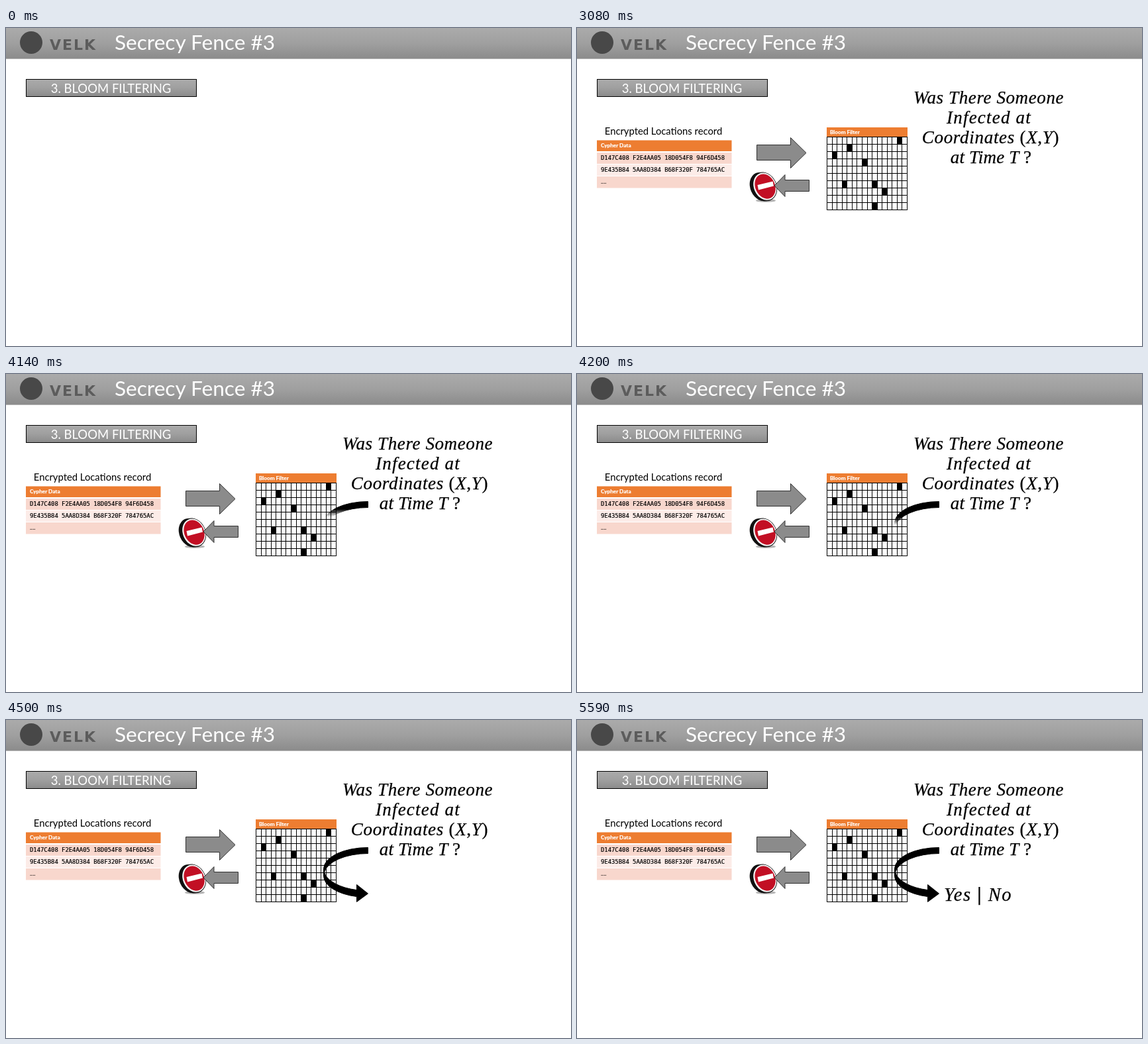
These frames come from a looping animation (853 by 480 pixels, 7.73 s). An HTML page:

```html
<!DOCTYPE html>
<html lang="en">
<head>
<meta charset="utf-8">
<title>Bloom filtering</title>
<style>
html, body { margin: 0; width: 100%; height: 100%; overflow: hidden; background: #fff; }
svg { display: block; width: 100%; height: 100%; }
text { font-family: Lato, "Open Sans", sans-serif; white-space: pre; }
.white { fill: #fff; }
.head { fill: #fff; stroke: #fff; stroke-width: .25; font-size: 8.2px; font-weight: 700; }
.code { font: 8.9px "DejaVu Sans Mono", monospace; stroke: #000; stroke-width: .2; }
.mid { text-anchor: middle; }
.math text { font: italic 27px "Liberation Serif", "Noto Serif", serif; text-anchor: middle; stroke: #000; stroke-width: .25; }
.math .up { font-style: normal; }
.crisp { shape-rendering: crispEdges; }
.block { fill: #8b8b8b; stroke: #303030; }
</style>
</head>
<body>
<svg viewBox="0 0 853 480" xmlns="http://www.w3.org/2000/svg">
  <defs>
    <linearGradient id="steel" x2="0" y2="1">
      <stop stop-color="#ababab"/>
      <stop offset=".5" stop-color="#9f9f9f"/>
      <stop offset="1" stop-color="#8b8b8b"/>
    </linearGradient>
    <linearGradient id="down" gradientUnits="userSpaceOnUse" x1="0" x2="0">
      <stop stop-color="#fff"/><stop offset="1" stop-color="#000"/>
    </linearGradient>
    <linearGradient id="across" gradientUnits="userSpaceOnUse" y1="0" y2="0">
      <stop stop-color="#fff"/><stop offset="1" stop-color="#000"/>
    </linearGradient>
    <mask id="downMask" maskUnits="userSpaceOnUse" x="0" y="0" width="853" height="480">
      <rect width="853" height="480" fill="url(#down)"/>
    </mask>
    <mask id="acrossMask" maskUnits="userSpaceOnUse" x="0" y="0" width="853" height="480">
      <rect width="853" height="480" fill="url(#across)"/>
    </mask>
  </defs>

  <rect width="853" height="480" fill="#fff"/>
  <rect width="853" height="46.6" fill="url(#steel)"/>
  <circle cx="38" cy="22" r="17" fill="#484848"/>
  <text x="66" y="33" font-size="22" font-weight="700" letter-spacing="2" fill="#5c5c5c"
    style="font-family:'DejaVu Sans',sans-serif">VELK</text>
  <text class="white" x="164" y="33" font-size="31.6">Secrecy Fence #3</text>

  <rect x="30.5" y="77.5" width="257" height="26" fill="url(#steel)" stroke="#000"/>
  <text class="white mid" x="158.5" y="98" font-size="18.5">3. BLOOM FILTERING</text>

  <g id="record">
    <text class="mid" x="130.5" y="161" font-size="14.8">Encrypted Locations record</text>
    <rect x="30" y="169.5" width="203.5" height="16.5" fill="#ed7d31"/>
    <rect x="30" y="188" width="203.5" height="17" fill="#f8d7cd"/>
    <rect x="30" y="206" width="203.5" height="17" fill="#fcece8"/>
    <rect x="30" y="224" width="203.5" height="17.5" fill="#f8d7cd"/>
    <text class="head" x="36" y="180">Cypher Data</text>
    <text class="code" x="36" y="199.3">D147C408 F2E4AA05 18D054F8 94F6D458</text>
    <text class="code" x="36" y="217.3">9E435B84 5AA8D384 B68F320F 784765AC</text>
    <text x="36" y="235" font-size="9">....</text>

    <path class="block" d="M271.5 176.5H322.5V165.5L346 188.5 322.5 211.5V199.5H271.5Z"/>

    <ellipse cx="285" cy="260.5" rx="15" ry="2.5" fill="#b5b5b5"/>
    <g transform="rotate(-24 282 240)">
      <ellipse cx="279.5" cy="238.5" rx="17.5" ry="22.5" fill="#111"/>
      <ellipse cx="283.5" cy="240" rx="18" ry="22.5" fill="#111"/>
      <ellipse cx="284" cy="240" rx="16.8" ry="21.3" fill="#f4f4f4"/>
      <ellipse cx="284.3" cy="240" rx="14.8" ry="19.3" fill="#c20f24"/>
    </g>
    <path class="white" d="M272.5 237L295.5 231.5 297 238.5 274 244.5Z"/>
    <path class="block" d="M350.5 229.5H314V221.5L298 238 314 254.5V246.5H350.5Z"/>

    <rect class="crisp" x="377" y="150" width="122" height="15" fill="#ed7d31"/>
    <text class="head" x="382" y="160">Bloom Filter</text>
    <path id="cells" class="crisp"/>
    <path id="grid" class="crisp" stroke="#000" fill="none"/>
  </g>

  <g id="question" class="math">
    <text x="621.5" y="114" letter-spacing=".6">Was There Someone</text>
    <text x="622" y="144" letter-spacing="1.2">Infected at</text>
    <text x="624.5" y="174" letter-spacing=".7">Coordinates <tspan class="up">(</tspan>X<tspan class="up">,</tspan>Y<tspan class="up">)</tspan></text>
    <text x="625" y="204" letter-spacing=".2">at Time T <tspan class="up">?</tspan></text>
  </g>

  <g id="turn" mask="url(#downMask)">
    <path stroke="#000" d="M546.5 192.5A67 32.5 0 0 0 479.5 225V235A67 32.5 0 0 0 529.5 266.6V274.5L546.5 262 529.5 248.5V256.6A67 32.5 0 0 1 480.5 230A67 32.5 0 0 1 546.5 201.5Z"/>
  </g>

  <g id="answer" class="math" mask="url(#acrossMask)">
    <text x="605.5" y="273" style="font-size:28.5px" letter-spacing="1.5">Yes <tspan class="up" font-weight="700">|</tspan> No</text>
  </g>
</svg>
<script>
const LOOP = 7730, STEP = 60;
const $ = id => document.getElementById(id);

const GRID = { x: 377, y: 164, cols: 16, rows: 10, w: 121 / 16, h: 11 };
const MARKS = [[14, 0], [4, 1], [1, 2], [7, 3], [3, 6], [9, 6], [11, 7], [9, 9]];

function buildGrid({ x, y, cols, rows, w, h }) {
  const colX = c => Math.round(x + c * w);
  let lines = "";
  for (let c = 0; c <= cols; c++) lines += `M${colX(c) + .5} ${y}v${rows * h}`;
  for (let r = 0; r <= rows; r++) lines += `M${x} ${y + r * h + .5}h${cols * w + 1}`;
  $("grid").setAttribute("d", lines);
  $("cells").setAttribute("d", MARKS.map(([c, r]) =>
    `M${colX(c)} ${y + r * h}H${colX(c + 1)}v${h}H${colX(c)}Z`).join(""));
}

function show(id, on) {
  $(id).style.display = on ? "" : "none";
}

// Soft-edged wipe that advances in fixed steps
function wipe(id, axis, t, { start, steps, edge, soft, stride }) {
  const k = Math.max(0, Math.min(steps - 1, Math.floor((t - start) / STEP)));
  const end = edge + k * stride;
  $(id).setAttribute(axis + 1, end - soft);
  $(id).setAttribute(axis + 2, end);
}

const TURN = { start: 4080, steps: 8, edge: 204, soft: 12, stride: 12 };
const ANSWER = { start: 5230, steps: 7, edge: 579, soft: 17, stride: 17 };

function draw(t) {
  show("record", t >= 870);
  show("question", t >= 3080);
  show("turn", t >= TURN.start);
  show("answer", t >= ANSWER.start);
  wipe("down", "y", t, TURN);
  wipe("across", "x", t, ANSWER);
}

buildGrid(GRID);
draw(0);
const began = performance.now();
(function tick() {
  draw((performance.now() - began) % LOOP);
  requestAnimationFrame(tick);
})();
</script>
</body>
</html>
```
